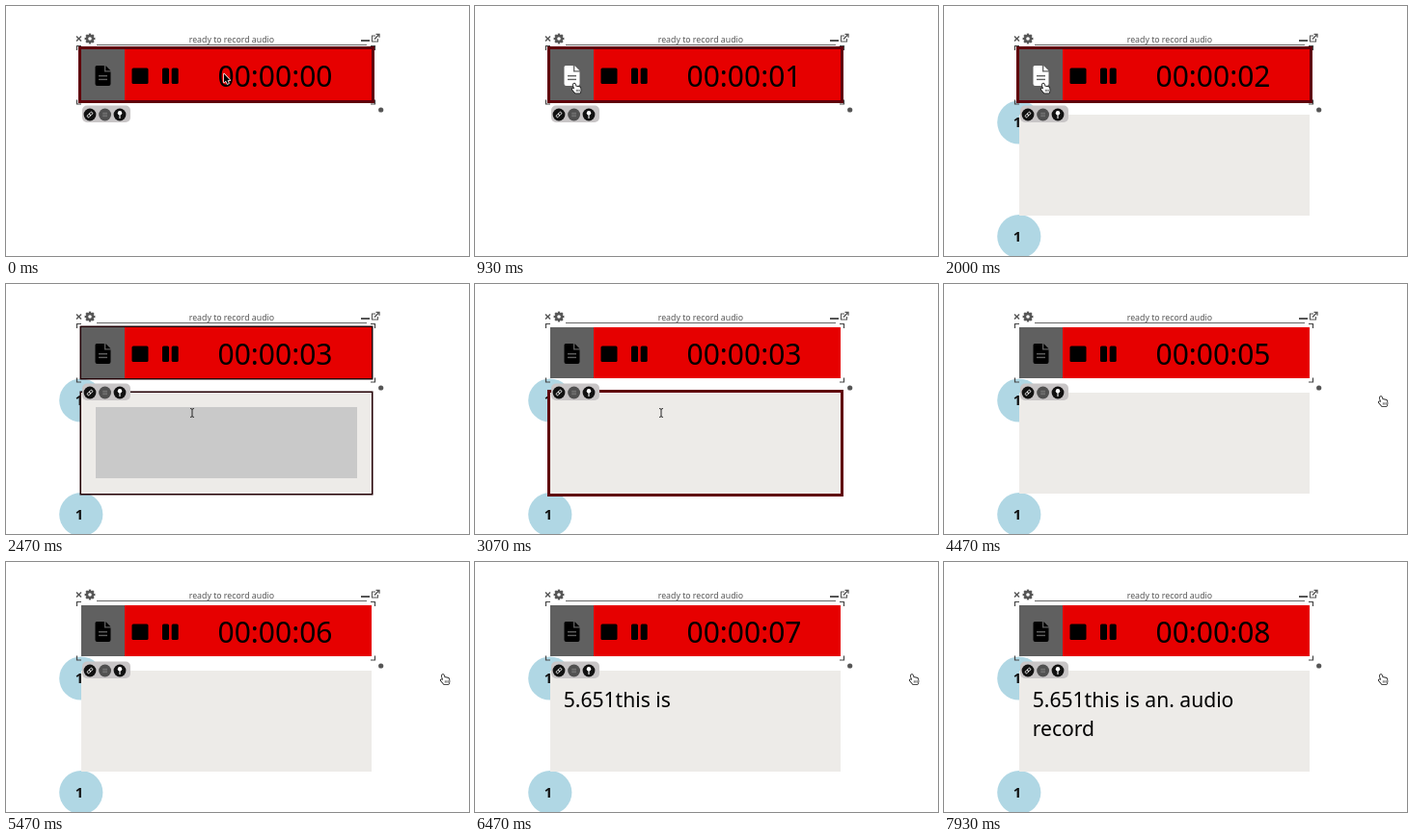
An HTML page with a canvas that plays this animation: 480 by 260 pixels, repeating every 8000 ms.

```html
<!DOCTYPE html>
<html lang="en">
<head>
<meta charset="utf-8">
<title>Audio recorder</title>
<style>
  html, body { margin: 0; width: 100%; height: 100%; overflow: hidden; background: #fff; }
  canvas { display: block; width: 480px; height: 260px; }
</style>
</head>
<body>
<canvas id="stage" width="480" height="260"></canvas>
<script>
const ctx = document.getElementById('stage').getContext('2d');
const LOOP = 8000;
const FONT = '"Noto Sans", "Open Sans", sans-serif';
const GREY = '#555', CELL = '#606060', RED = '#e60000', PANEL = '#edebe8';
const BAR = [78, 45, 301, 53], NOTE = [78, 113, 301, 105];
const WORDS = [[5660, '5.651this'], [6195, ' is'], [6995, ' an.'], [7325, ' audio']];

const clamp = v => Math.max(0, Math.min(1, v));
const ramp = (t, a, b) => clamp((t - a) / (b - a));
const mix = (a, b, p) => a + (b - a) * p;
const easeInOut = p => p * p * (3 - 2 * p);
const easeOut = p => 1 - (1 - p) * (1 - p);
const inside = (p, [x, y, w, h]) => p.x >= x && p.x <= x + w && p.y >= y && p.y <= y + h;

function box(x, y, w, h, color, r = 0) {
  ctx.fillStyle = color;
  ctx.beginPath();
  ctx.roundRect(x, y, w, h, r);
  ctx.fill();
}

function disc(x, y, r, color) {
  ctx.fillStyle = color;
  ctx.beginPath();
  ctx.arc(x, y, r, 0, Math.PI * 2);
  ctx.fill();
}

function line(points, color, width = 1) {
  ctx.strokeStyle = color;
  ctx.lineWidth = width;
  ctx.beginPath();
  points.forEach(([x, y]) => ctx.lineTo(x, y));
  ctx.stroke();
}

function text(str, x, y, size, color = '#000', align = 'left', weight = 400) {
  ctx.font = `${weight} ${size}px ${FONT}`;
  ctx.fillStyle = color;
  ctx.textAlign = align;
  ctx.fillText(str, x, y);
}

// Focus border that grows outward from a panel
function focusRing([x, y, w, h], k) {
  if (k <= 0) return;
  const s = 3 * k;
  ctx.strokeStyle = `rgb(${Math.round(96 * k ** 1.5)},0,${Math.round(10 * k)})`;
  ctx.lineWidth = s;
  ctx.strokeRect(x - s / 2, y - s / 2, w + s, h + s);
}

function fileIcon(color) {
  ctx.fillStyle = color;
  ctx.fill(new Path2D('M94 62H102V68.5H108.5V81Q108.5 83 106.5 83H94.5Q92.5 83 92.5 81V63.5Q92.5 62 94 62Z'));
  ctx.fill(new Path2D('M103.3 62L108.5 67.3H103.3Z'));
  for (const y of [72.7, 76.4]) line([[96, y], [105, y]], CELL, 1.4);
}

function gear(x, y) {
  for (let i = 0; i < 4; i++) {
    const a = i * Math.PI / 4, dx = 5.4 * Math.cos(a), dy = 5.4 * Math.sin(a);
    line([[x - dx, y - dy], [x + dx, y + dy]], GREY, 2.4);
  }
  disc(x, y, 4.2, GREY);
  disc(x, y, 1.8, '#fff');
}

function frameTools() {
  line([[73, 31.5], [78, 36.5]], GREY, 1.4);
  line([[78, 31.5], [73, 36.5]], GREY, 1.4);
  gear(87, 34);
  text('ready to record audio', 233.9, 37.5, 8.75, GREY, 'center');
  line([[94, 40.5], [374, 40.5]], '#666');
  box(368, 35, 9, 2, GREY);
  line([[383, 31], [379.5, 31], [379.5, 37], [385.5, 37], [385.5, 34]], GREY, 1.1);
  line([[382, 34.5], [386.5, 29.8]], GREY, 1.3);
  line([[383.5, 29.3], [387, 29.3], [387, 32.8]], GREY, 1.3);
  for (const [x, sx] of [[73.5, 1], [382.5, -1]])
    for (const [y, sy] of [[41.5, 1], [102, -1]])
      line([[x + 4.5 * sx, y], [x, y], [x, y + 4.5 * sy]], '#444', 1.2);
  disc(388.7, 108, 2.6, GREY);
}

function pill() {
  box(79, 103.5, 50, 17.5, '#c8c5c6', 5);
  disc(87, 113, 6.4, '#111');
  disc(102.6, 113, 6.4, '#505050');
  disc(118, 113, 6.4, '#111');
  ctx.save();
  ctx.translate(87, 113);
  ctx.rotate(-Math.PI / 4);
  ctx.strokeStyle = '#fff';
  ctx.lineWidth = 0.9;
  for (const x of [-3.3, -0.3]) {
    ctx.beginPath();
    ctx.roundRect(x, -1.2, 3.6, 2.4, 1.2);
    ctx.stroke();
  }
  ctx.restore();
  for (const d of [-1.7, 0, 1.7]) line([[100.2, 113 + d], [105, 113 + d]], '#888', 0.7);
  disc(118, 111.3, 2.2, '#fff');
  line([[118, 112], [118, 117]], '#fff', 1.1);
}

function badge(y) {
  disc(77.8, y, 22.6, '#b0d7e4');
  text('1', 76, y + 5.2, 14.8, '#111', 'center', 700);
}

function recorder(t, hover, ring) {
  focusRing(BAR, ring);
  box(...BAR, RED);
  box(78, 45, 45, 53, CELL);
  fileIcon(hover ? '#fff' : '#000');
  box(130.5, 64.5, 17, 16.5, '#000', 1.5);
  box(162, 64.5, 7, 16.5, '#000', 1.5);
  box(171.7, 64.5, 7, 16.5, '#000', 1.5);
  const secs = Math.floor((t + 535) / 1000);
  text('00:00:' + String(secs).padStart(2, '0'), 279, 84, 30, '#000', 'center');
}

function note(t, ring) {
  focusRing(NOTE, ring);
  box(...NOTE, PANEL);
  const press = ramp(t, 2400, 2465) * (1 - ramp(t, 2535, 2735));
  if (press > 0) {
    ctx.globalAlpha = press;
    box(93, 128, 271, 74, '#c9c9c9');
    ctx.globalAlpha = 1;
  }
  const typed = WORDS.filter(([at]) => t >= at).map(([, w]) => w).join('');
  text(typed, 91.7, 151, 21.1);
  if (t >= 7795) text('record', 91.7, 181, 21.1);
}

function pointerAt(t) {
  if (t < 2000) {
    const p = easeInOut(ramp(t, 20, 900));
    return { x: mix(228.5, 105, p), y: mix(75.5, 85.5, p) };
  }
  if (t < 3300) {
    const p = easeInOut(ramp(t, 2010, 2440));
    return { x: mix(105, 193, p), y: mix(85.5, 134, p) };
  }
  const p = ramp(t, 3300, 4150);
  return { x: mix(193, 455, easeOut(p)), y: mix(134, 122, 1 - (1 - p) ** 4) };
}

function shape(d, fill, stroke, width) {
  const path = new Path2D(d);
  ctx.lineJoin = 'round';
  ctx.strokeStyle = stroke;
  ctx.lineWidth = width;
  ctx.stroke(path);
  ctx.fillStyle = fill;
  ctx.fill(path);
  ctx.lineJoin = 'miter';
}

const pointers = {
  arrow() {
    shape('M-2.5 -5V4L-0.5 2.2L1 5.5L2.5 4.8L1.1 1.7H3.8Z', '#000', '#fff', 1.4);
  },
  hand() {
    shape('M-2.8 -4.6Q-1.9 -5.4 -1.2 -4.4L-0.1 -1.6Q0.8 -2.4 1.5 -1.5Q2.4 -2 3 -1.1Q4 -1.4 4.3 -0.3L4.6 2Q4.6 3.6 3.8 5H-1L-4.2 1.2Q-4.3 0 -3 0.2L-1.8 1.1L-3.2 -3.2Q-3.4 -4.2 -2.8 -4.6Z',
      '#fff', '#111', 1.5);
    for (const x of [0.3, 1.8, 3.2]) line([[x, 1.3], [x, 3.6]], '#111', 0.6);
  },
  beam() {
    line([[0, -4], [0, 4]], '#333', 1.1);
    for (const s of [-1, 1]) line([[-2, 4.6 * s], [0, 3.8 * s], [2, 4.6 * s]], '#333', 1);
  }
};

function draw(t) {
  const open = t >= 1995;
  const p = pointerAt(t);
  const overBar = inside(p, BAR), overNote = open && inside(p, NOTE);
  const hover = overBar && p.x < 123;
  const shift = ramp(t, 2405, 2535);

  ctx.fillStyle = '#fff';
  ctx.fillRect(0, 0, 480, 260);
  if (open) {
    badge(121);
    badge(239.7);
    note(t, shift * (1 - ramp(t, 4140, 4265)));
  }
  recorder(t, hover, 1 - shift);
  frameTools();
  pill();

  ctx.save();
  ctx.translate(p.x, p.y);
  pointers[overNote ? 'beam' : overBar && !hover ? 'arrow' : 'hand']();
  ctx.restore();
}

const start = performance.now();
function tick() {
  draw((performance.now() - start) % LOOP);
  requestAnimationFrame(tick);
}
tick();
</script>
</body>
</html>
```
